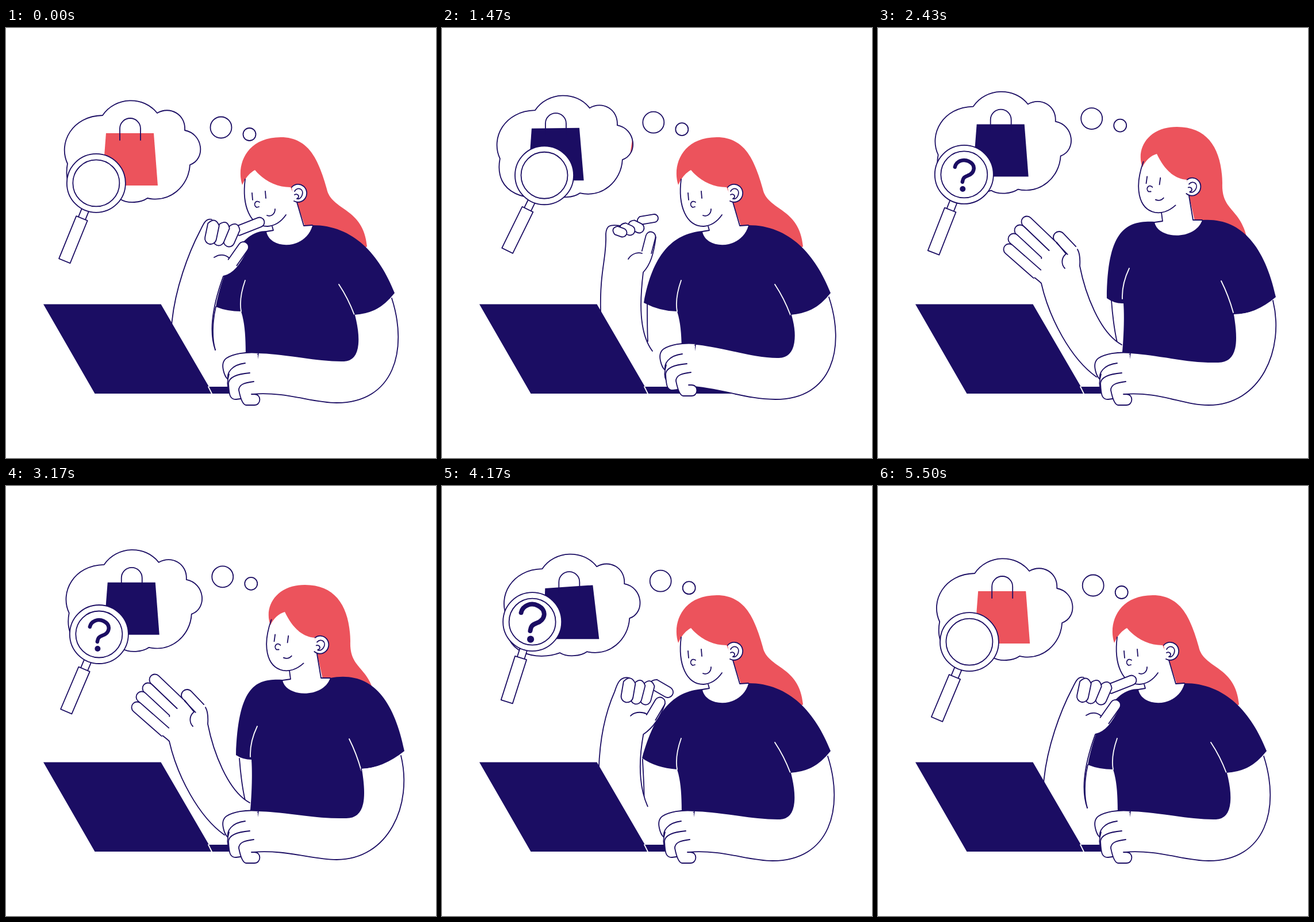
An HTML page for the animation above (5530 ms loop, 748x748 px).

```html
<!DOCTYPE html>
<html lang="en">
<head>
<meta charset="utf-8">
<title>Thinking about a purchase</title>
<style>
html, body { margin: 0; width: 100%; height: 100%; overflow: hidden; background: #fff; }
svg { display: block; width: 100vw; height: 100vh; }
</style>
</head>
<body>
<svg id="stage" viewBox="0 0 748 748"></svg>
<script>
const LOOP = 5530, NAVY = '#1b0d63', RED = '#ec535c';
const stage = document.getElementById('stage');

// ---------- drawing helpers ----------
function el(tag, attrs, parent = stage) {
  const e = document.createElementNS('http://www.w3.org/2000/svg', tag);
  for (const a in attrs) e.setAttribute(a, attrs[a]);
  return parent.appendChild(e);
}
const group = (parent = stage) => el('g', {}, parent);
const shape = (fill, d = '', parent = stage) => el('path', { fill, d }, parent);
const line = (d = '', parent = stage, fill = 'none', stroke = NAVY) => el('path', {
  d, fill, stroke, 'stroke-width': 1.8, 'stroke-linecap': 'round', 'stroke-linejoin': 'round'
}, parent);
const ring = (cx, cy, r, parent) => el('circle', {
  cx, cy, r, fill: '#fff', stroke: NAVY, 'stroke-width': 1.8
}, parent);
const setD = (node, d) => node.setAttribute('d', d);
const move = (node, s) => node.setAttribute('transform', s);

// ---------- interpolation ----------
const NUM = /-?[\d.]+/g;
const nums = s => s.match(NUM).map(Number);
function mix(a, b, k) {
  if (typeof a === 'number') return a + (b - a) * k;
  if (Array.isArray(a)) return a.map((v, i) => mix(v, b[i], k));
  const n = nums(b);
  let i = 0;
  return a.replace(NUM, v => mix(+v, n[i++], k).toFixed(2));
}
const smooth = x => x * x * (3 - 2 * x);
const quad = x => x < .5 ? 2 * x * x : 1 - 2 * (1 - x) * (1 - x);
const clamp = x => Math.max(0, Math.min(1, x));
function track(keys, t) {
  if (t <= keys[0][0]) return keys[0][1];
  for (let i = 1; i < keys.length; i++) {
    const [t0, a] = keys[i - 1], [t1, b] = keys[i];
    if (t <= t1) return mix(a, b, smooth((t - t0) / (t1 - t0)));
  }
  return keys[keys.length - 1][1];
}
// Smooth curve through one column of the keys; each loop adds `lap`.
function spline(keys, col, t, lap = 0) {
  const n = keys.length;
  const key = i => {
    const turn = Math.floor(i / n), k = keys[i - turn * n];
    return [k[0] + turn * LOOP, k[col] + turn * lap];
  };
  let i = 0;
  while (key(i + 1)[0] <= t) i++;
  const [p, a, b, q] = [-1, 0, 1, 2].map(o => key(i + o));
  const h = b[0] - a[0], x = (t - a[0]) / h, y = 1 - x;
  const m0 = (b[1] - p[1]) / (b[0] - p[0]) * h, m1 = (q[1] - a[1]) / (q[0] - a[0]) * h;
  return a[1] * (1 + 2 * x) * y * y + m0 * x * y * y + b[1] * x * x * (3 - 2 * x) - m1 * x * x * y;
}

// ---------- limbs and fingers ----------
function limb(parent = stage) {
  const fill = shape('#fff', '', parent), a = line('', parent), b = line('', parent);
  return (da, db, cuff = '') => {
    const n = nums(db), pts = [];
    for (let i = n.length - 2; i >= 0; i -= 2) pts.push(n[i] + ' ' + n[i + 1]);
    const close = cuff && `Q${cuff} ${nums(da).slice(0, 2).join(' ')}`;
    setD(fill, `${da} L${pts[0]} C${pts.slice(1).join(' ')} ${close}Z`);
    setD(a, da);
    setD(b, db);
  };
}
function capsule([x0, y0, x1, y1, w], closed) {
  const r = w / 2, len = Math.hypot(x1 - x0, y1 - y0) || 1;
  const ux = (x1 - x0) / len * r, uy = (y1 - y0) / len * r;
  const start = `${x0 + uy} ${y0 - ux}`;
  const knuckle = closed ? ` Q${x0 - ux * 1.5} ${y0 - uy * 1.5} ${start}` : '';
  return `M${start} L${x1 + uy} ${y1 - ux} A${r} ${r} 0 0 1 ${x1 - uy} ${y1 + ux} ` +
    `L${x0 - uy} ${y0 + ux}` + knuckle;
}

// ---------- thought cloud ----------
const CLOUD = 'M168 152 C190 119 240 118 263 148 C285 135 313 150 311 178 C343 184 348 228 320 238 ' +
  'C318 275 285 305 246 296 C235 304 212 306 199 298 C160 313 95 300 107 236 C90 200 115 153 168 152Z';
const thought = group();
shape('none', CLOUD, el('clipPath', { id: 'inside' }, thought));
const shelf = el('g', { 'clip-path': 'url(#inside)' }, thought);
function bag(color) {
  const g = group(shelf), body = shape(color, '', g);
  const grip = line('M198 195 V175 A18 18 0 0 1 234 175 V195', g);
  // the top sways while the bottom stays level
  return (x, sway) => {
    const tip = sway * .7;
    move(g, `translate(${x} 0)`);
    move(grip, `translate(${sway} 0)`);
    setD(body, `M${174 + sway} ${183 - tip} L${257 + sway} ${183 + tip} L264 274 H167Z`);
  };
}
const redBag = bag(RED), navyBag = bag(NAVY);
line(CLOUD, thought);
ring(374, 173, 18.5, thought);
ring(423.5, 185, 11, thought);

const lens = group(thought), handle = group(lens);
line('M-6.5 48 V68 H6.5 V48', handle, '#fff');
line('M-10.5 66 H10.5 V146 H-10.5Z', handle, '#fff');
ring(0, 0, 51, lens);
ring(0, 0, 40.5, lens);
const query = group(lens);
el('path', {
  d: 'M-16 -13 C-14 -23 -2 -28 8 -23 C22 -16 18 -2 6 2 C-2 5 -2 8 -3 13',
  fill: 'none', stroke: NAVY, 'stroke-width': 6.5, 'stroke-linecap': 'round'
}, query);
el('circle', { cx: -2.5, cy: 25, r: 5, fill: NAVY }, query);

// time, angle, radius
const ORBIT = [[0, 128, 16.4], [730, 236, 18.6], [1470, 385, 19], [2430, 498, 20],
  [3170, 476, 18], [4170, 579, 20.7], [5500, 840, 16.4]];
const POP = [[1700, 0], [1950, 1.2], [2100, 1], [4050, 1], [4170, 1.22], [4400, 0]];
const SWAY_OUT = [[0, 0], [.09, -4], [.6, 6], [1, 7]];
const SWAY_IN = [[0, 0], [.09, -4], [.5, -4], [.81, -.7], [1, 0]];

function drawThought(t) {
  const w = t / LOOP * 2 * Math.PI;
  move(thought, `translate(${-6.2 * Math.sin(w)} ${-8 * (1 - Math.cos(w))})`);

  const back = t > 3000, p = clamp((t - (back ? 4090 : 780)) / 850), slid = quad(p);
  const [leave, enter] = back ? [navyBag, redBag] : [redBag, navyBag];
  leave(slid * 172, track(SWAY_OUT, p));
  enter((slid - 1) * 160, track(SWAY_IN, p));

  const a = spline(ORBIT, 1, t, 720) * Math.PI / 180, r = spline(ORBIT, 2, t);
  move(lens, `translate(${167 + r * Math.cos(a)} ${257 + r * Math.sin(a)})`);
  move(handle, `rotate(${22 - 4.3 * Math.cos(a - 3.84)})`);
  move(query, `scale(${track(POP, t)})`);
}

// ---------- head and body ----------
const hair = shape(RED), shirt = shape(NAVY);
const seams = line('', stage, 'none', '#fff');
const neck = shape('#fff'), neckLines = line();
const head = group();
line('M416 263 C410 310 425 345 455 345 C470 344 480 335 487 325', head);
line('M428 287 L429 299 M451 284 L452 296', head);
line('M441 303 C434 298 429 308 436 312 L440 311', head);
const mouth = line('', head);
line('M497 277 A15 15.5 0 1 1 501 301', head, '#fff');
line('M502 284 C507 275 519 280 515 291 C513 296 510 298 506 297 M502 290 C508 287 512 294 506 297', head);

const MOUTH = ['M454 326 C462 329 468 323 468 315', 'M451 323 C456 324 461 322 464 317'];
const HAIR = [
  'M411 273 C400 240 417 190 478 190 C530 190 545 235 558 280 C566 318 622 312 628 380 L600 400 ' +
  'L520 345 L505 300 L495 277 C470 277 448 265 433 247 C424 252 416 261 411 273Z',
  'M460 242 C448 210 470 172 520 172 C575 172 598 212 599 270 C597 320 632 312 643 371 L615 400 ' +
  'L553 345 L543 300 L537 264 C512 262 496 242 485 219 C474 222 465 231 460 242Z'];
const NECK = [
  'M464 340 L465 352 L453 354 C458 385 520 388 533 344 L518 344 L506 303 L487 325Z',
  'M493 321 L495 336 L481 338 C487 368 552 370 564 334 L548 334 L541 292 L515 312Z'];
const NECK_LINES = [
  'M463 345 L465 352 L453 354 M506 303 L518 344 L533 343',
  'M493 321 L495 336 L481 338 M541 292 L548 334 L564 334'];
const SEAMS = [
  'M416 439 Q405 470 409 493 M579 446 Q595 470 606 499',
  'M437 418 Q424 445 425 471 M597 440 Q610 466 618 495'];

const TORSO = ' 409 493 C416 515 417 540 417 575 L590 585 C640 575 630 540 606 499 ' +
  'Q645 500 676 461 C650 395 605 343 533 343 L500 350Z';
const SHIRT = {
  chin: 'M453 353 C415 352 382 400 365 485 Q385 493' + TORSO,
  fist: 'M453 353 C400 358 370 390 346 472 Q370 490' + TORSO,
  pinch: 'M453 353 C400 358 366 395 351 478 Q380 493' + TORSO,
  palm: 'M481 337 C432 335 399 350 398 470 Q412 480 427 479 C429 505 427 545 424 575 L595 585 ' +
    'C650 570 645 545 618 498 Q655 499 692 468 C672 375 628 329 564 334 L530 340Z',
  rest: 'M481 337 C436 335 404 345 400 468 Q412 476 427 476 C429 505 427 545 424 575 L595 585 ' +
    'C650 570 645 545 618 492 Q655 491 693 461 C674 368 634 321 564 334 L530 340Z'
};
const LEAN = [[1550, 0], [2200, 1], [3350, 1], [3980, 0]];

// ---------- raised arm ----------
const upperArm = line(), forearm = limb();
const thumb = line('', stage, '#fff');
const fingers = [0, 1, 2, 3].map(() => line('', stage, '#fff'));
const crease = line();

// fingers run from index to little; each is base, tip, width
const POSE = {
  chin: {
    left: 'M358 333 C346 330 342 345 338 352 C318 390 293 455 288 518',
    right: 'M421 386 C408 412 396 428 378 432 C366 465 350 520 364 560',
    upper: 'M365 485 C359 510 358 540 364 560',
    crease: 'M362 399 L364 398 C371 393 382 394 388 400',
    thumb: [394, 408, 413, 381, 18],
    fingers: [[403, 353, 441, 338, 17], [398, 348, 388, 371, 19], [380, 345, 370, 369, 19], [361, 342, 356, 366, 20]]
  },
  fist: {
    left: 'M322 334 C305 330 300 345 296 358 C280 395 272 440 271 490',
    right: 'M384 378 C377 400 366 418 347 432 C340 475 340 520 357 557',
    upper: 'M347 474 C349 500 351 520 350 538',
    crease: 'M324 400 L326 398 C334 392 346 393 352 396',
    thumb: [360, 402, 375, 376, 18],
    fingers: [[365, 344, 387, 361, 19], [356, 346, 350, 371, 19], [340, 345, 334, 370, 19], [322, 342, 318, 366, 21]]
  },
  pinch: {
    left: 'M310 344 C290 341 286 345 285 358 C287 400 274 420 276 495',
    right: 'M372 364 C368 395 362 412 350 425 C344 475 342 530 366 562',
    upper: 'M357 480 C357 500 357 525 358 545',
    crease: 'M324 402 L326 399 C333 391 342 390 348 392',
    thumb: [356, 390, 363, 363, 17],
    fingers: [[345, 335, 369, 331, 14], [331, 342, 343, 348, 17], [316, 347, 327, 352, 17], [303, 352, 314, 356, 15]]
  },
  palm: {
    left: 'M272 434 C276 437 280 440 284 444 C298 505 335 575 380 607',
    right: 'M347 385 C351 392 352 400 351 414 C360 460 385 530 424 551',
    upper: 'M406 474 C408 500 411 525 416 547',
    crease: 'M311 373 L327 393 C318 400 319 412 325 418',
    thumb: [337, 387, 315, 364, 20],
    fingers: [[304, 380, 259, 337, 19], [291, 394, 247, 352, 19], [278, 406, 236, 367, 19], [277, 428, 228, 385, 19]]
  }
};
const ARM_KEYS = [[0, 'chin'], [230, 'chin'], [680, 'fist'], [800, 'fist'], [1300, 'pinch'], [1550, 'pinch'],
  [2200, 'palm'], [3350, 'palm'], [4050, 'fist'], [4650, 'chin']];
const part = (name, t) => track(ARM_KEYS.map(([at, p]) => [at, POSE[p][name]]), t);
const shirtKeys = ARM_KEYS.map(([at, p]) => [at, SHIRT[p]]);
shirtKeys.splice(7, 1, [2450, SHIRT.palm], [3150, SHIRT.rest], [3350, SHIRT.rest]);

function drawBody(t) {
  const k = track(LEAN, t), pair = p => mix(p[0], p[1], k);
  setD(hair, pair(HAIR));
  setD(neck, pair(NECK));
  setD(neckLines, pair(NECK_LINES));
  setD(seams, pair(SEAMS));
  setD(mouth, pair(MOUTH));
  setD(shirt, track(shirtKeys, t));
  move(head, `translate(${38 * k} ${-11 * k}) rotate(${12.5 * k} 509 288)`);

  setD(upperArm, part('upper', t));
  forearm(part('left', t), part('right', t));
  setD(thumb, capsule(part('thumb', t), false));
  const curled = t < 1870 || t > 3700;
  part('fingers', t).forEach((f, i) => setD(fingers[i], capsule(f, curled)));
  setD(crease, part('crease', t));
}

// ---------- laptop ----------
shape(NAVY, 'M65 480.5 H269.5 L353 624 H530 L520 636 H154.5Z');
line('M352 624 L358 636', stage, 'none', '#fff');

// ---------- resting arm ----------
const restArm = limb(), hand = group();
shape('#fff', 'M438 568 C400 566 382 577 382 590 L388 612 L391 643 L410 644 L428 636 L438 635Z', hand);
const index = line('', hand, '#fff');
line('M388 602 C384 616 385 624 388 629', hand);
line('M424 600 C400 602 388 608 387 618 C388 640 390 646 400 646 L408 645', hand, '#fff');
line('M431 615 C415 617 405 620 405 630 C408 645 412 656 418 656 L432 656 C444 656 445 637 432 637 L427 637', hand, '#fff');

const INDEX = [
  'M440 565 C415 563 395 567 384 574 C378 578 376 586 378 595 C380 604 382 608 386 611 C384 600 392 586 416 583',
  'M440 565 C419 562 392 574 357 591 C348 595 349 608 358 609 C369 610 381 603 389 598 C397 593 403 585 423 583'];
// inner edge, outer edge, bend of the cuff
const REST = {
  down: ['M606 499 C614 530 620 578 588 579 C540 580 490 566 440 565',
    'M671 470 C700 560 675 652 575 652 C530 652 490 632 427 637', '643 497'],
  up: ['M607 499 C616 530 618 572 586 573 C540 574 490 554 442 550',
    'M673 468 C702 555 680 646 580 646 C530 646 490 628 430 623', '645 496'],
  lean: ['M618 498 C626 545 625 581 592 581 C540 583 490 568 440 565',
    'M687 474 C708 560 665 656 575 656 C530 656 490 632 427 637', '655 498'],
  settle: ['M618 492 C626 540 625 577 592 577 C540 579 490 566 440 565',
    'M687 469 C708 555 665 650 575 650 C530 650 490 632 427 637', '655 490']
};
const REST_KEYS = [[200, REST.down], [600, REST.up], [1600, REST.up], [2200, REST.lean], [2450, REST.lean],
  [3150, REST.settle], [3350, REST.settle], [3980, REST.down]];
const LIFT = [[200, [0, 0]], [600, [3, -11.5]], [850, [3, -11.5]], [1200, [2, -16]], [1600, [2, -16]], [2200, [0, 0]]];
const POINT = [[300, 0], [650, 1], [850, 1], [1200, 0]];

function drawRest(t) {
  restArm(...track(REST_KEYS, t));
  move(hand, `translate(${track(LIFT, t).join(' ')})`);
  setD(index, mix(INDEX[0], INDEX[1], track(POINT, t)));
}

function frame() {
  const t = performance.now() % LOOP;
  drawThought(t);
  drawBody(t);
  drawRest(t);
  requestAnimationFrame(frame);
}
frame();
</script>
</body>
</html>
```
